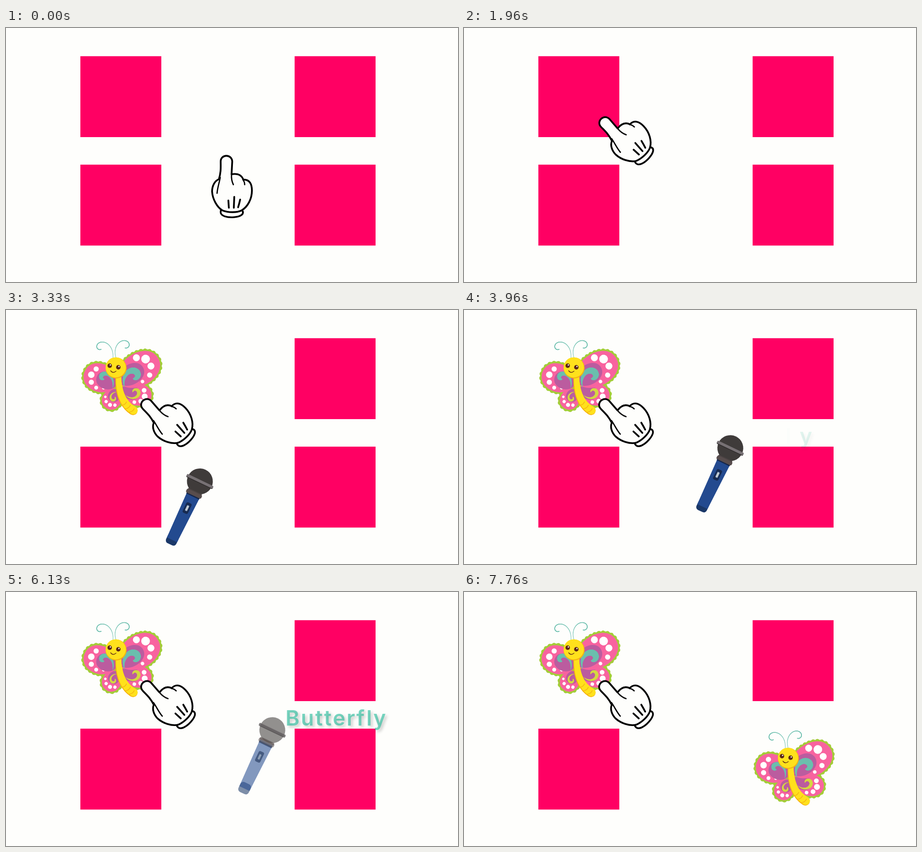
An HTML page with a canvas for the animation above (8 s loop, 998 by 561 pixels).

```html
<!DOCTYPE html>
<html lang="en">
<head>
<meta charset="utf-8">
<title>Memory cards</title>
<style>
html, body { margin: 0; width: 100%; height: 100%; overflow: hidden; background: #fefefc; }
canvas { display: block; width: 998px; height: 561px; }
</style>
</head>
<body>
<canvas id="stage" width="998" height="561"></canvas>
<script>
const ctx = document.getElementById('stage').getContext('2d');
const LOOP = 8000;
const PAPER = '#fefefc', YELLOW = '#ffe11c', ORANGE = '#f5b313', BROWN = '#5c2716';
const TEAL = '#6cbfae', LIME = '#d5d842';
const CARD = 178.7, LEFT = 164.2, RIGHT = 637.3, TOP = 62.3, BOTTOM = 301.8;

const rad = deg => deg * Math.PI / 180;
const mix = (a, b, u) => a + (b - a) * u;
const span = (t, start, length) => Math.min(1, Math.max(0, (t - start) / length));
const easeInOut = u => u < 0.5 ? 2 * u * u : 1 - 2 * (1 - u) ** 2;
const easeOut = u => 1 - (1 - u) ** 3;

function dot(x, y, r, color) {
  ctx.fillStyle = color;
  ctx.beginPath();
  ctx.arc(x, y, r, 0, 7);
  ctx.fill();
}

function line(d, color, width) {
  ctx.strokeStyle = color;
  ctx.lineWidth = width;
  ctx.stroke(new Path2D(d));
}

// Rounded box centred on the vertical axis
function bar(y, w, h, r, color) {
  ctx.fillStyle = color;
  ctx.beginPath();
  ctx.roundRect(-w / 2, y, w, h, r);
  ctx.fill();
}

// Runs from a tip into a curl of the given radius; size(u) is the pen radius
function swirl(x, y, curl, tipX, tipY, dir, color, size) {
  const reach = Math.hypot(tipX - x, tipY - y), from = Math.atan2(tipY - y, tipX - x);
  for (let u = 0; u <= 1; u += 1 / 160) {
    const a = from + dir * u * rad(340), d = mix(curl, reach, (1 - u) ** 5);
    dot(x + d * Math.cos(a), y + d * Math.sin(a), size(u), color);
  }
}
const taper = r => u => 0.3 + r * Math.sin(Math.PI * u) ** 0.8;
const thin = () => 0.75;

// Each wing grows from a root on the body
const WINGS = [
  { x: 247, y: 176, angle: 122, length: 48, half: 21, spots: 4, first: -53, flip: 1 },
  { x: 245, y: 165, angle: 202, length: 77, half: 31, spots: 5, first: -40, flip: -1 },
  { x: 253, y: 176, angle: 15, length: 70, half: 25, spots: 4, first: -40, flip: 1 },
  { x: 248, y: 160, angle: -32, length: 103, half: 36, spots: 5, first: -68, flip: 1 }
];

function leaf({ length: l, half }) {
  const w = half / 0.75;
  const path = new Path2D();
  path.moveTo(0, 0);
  path.bezierCurveTo(l * 0.1, -w, l, -w, l, 0);
  path.bezierCurveTo(l, w, l * 0.1, w, 0, 0);
  return path;
}

function eachWing(paint) {
  for (const wing of WINGS) {
    ctx.save();
    ctx.translate(wing.x, wing.y);
    ctx.rotate(rad(wing.angle));
    ctx.scale(1, wing.flip);
    paint(wing, leaf(wing));
    ctx.restore();
  }
}

function scallops(wing, path) {
  ctx.strokeStyle = '#a3cd38';
  ctx.lineWidth = 7;
  ctx.stroke(path);
  ctx.lineWidth = 10.5;
  ctx.setLineDash([0, 9.5]);
  ctx.stroke(path);
}

function membrane(wing, path) {
  ctx.fillStyle = '#f8639f';
  ctx.fill(path);
  for (let i = 0; i < wing.spots; i++) {
    const a = rad(wing.first + 42 * i);
    dot(wing.length * (0.5 + 0.29 * Math.cos(a)), wing.half * 0.75 * Math.sin(a),
      wing.length * 0.093 * (1 - 0.2 * Math.abs(i - 1)), '#fff');
  }
  ctx.scale(0.62, 0.62);
  ctx.fillStyle = '#bb5c9f';
  ctx.fill(path);
}

function body(shift, shrink, color) {
  for (let u = 0; u <= 1; u += 0.02) {
    const x = mix(mix(248, 248, u), mix(248, 282, u), u);
    const y = mix(mix(148, 204, u), mix(204, 223, u), u);
    dot(x + shift, y - shift, 6.5 + 3.5 * u - shrink, color);
  }
}

function butterfly(dx, dy) {
  ctx.save();
  ctx.translate(dx, dy);
  ctx.lineCap = 'round';
  swirl(207, 81, 6.5, 236, 107, -1, TEAL, thin);
  swirl(265, 77, 7, 243, 106, 1, TEAL, thin);
  eachWing(scallops);
  eachWing(membrane);
  swirl(283, 144, 8, 262, 171, 1, TEAL, taper(6.8));
  swirl(215, 148, 5, 235, 174, -1, TEAL, taper(4.3));
  swirl(286, 182, 6.5, 264, 188, -1, LIME, taper(3));
  swirl(237, 195, 4.5, 244, 181, -1, LIME, taper(1.9));

  body(0, 0, ORANGE);
  body(0.8, 0.8, YELLOW);
  for (let i = 0; i < 3; i++) {
    const x = 254 + 8.5 * i, y = 211 + 7.5 * i;
    line(`M${x} ${y}q9 -1 12 -8`, ORANGE, 1.6);
  }

  dot(243, 128, 23.3, ORANGE);
  dot(242.3, 126.7, 22.3, YELLOW);
  for (const [x, y] of [[229, 123], [248, 126.5]]) {
    dot(x, y, 4.9, BROWN);
    dot(x + 1.4, y - 1.7, 1.5, '#fff');
  }
  line('M231 134Q236 141 243 135', BROWN, 1.3);
  ctx.restore();
}

function card(x, y, scale = 1) {
  const size = CARD * scale, inset = (CARD - size) / 2;
  ctx.fillStyle = '#ff0063';
  ctx.fillRect(x + inset, y + inset, size, size);
}

// Drawn around a pivot inside the palm
function hand(p) {
  ctx.save();
  ctx.translate(mix(492, 350.5, p), mix(346, 242.5, p));
  ctx.rotate(rad(-44 * p));
  ctx.lineCap = ctx.lineJoin = 'round';
  ctx.fillStyle = PAPER;
  const cuff = 'M-17 55C-20 63 -17 67 -9 70C3 74 21 72 28 67C32 64 32 60 29 56Z';
  const palm = 'M-22 -12C-32 -8 -37 4 -37 15C-36 32 -26 50 -14 57C-1 62 18 62 28 57' +
    'C42 49 51 31 51 13C51 -1 46 -12 32 -11C28 -22 18 -25 6 -23L7.500 -51C7 -68 -18 -68 -18 -51C-18 -38 -17 -28 -22 -12Z';
  for (const d of [cuff, palm]) {
    ctx.fill(new Path2D(d));
    line(d, '#000', 3.9);
  }
  line('M-1 35L0 51M12 27L11 51M25 33Q23 42 20.500 50', '#000', 3.9);
  line('M-19 -16C-21 -4 -25 6 -26 19M6 -23Q5 -10 10 0M31 -11Q35 -6 35 0', '#000', 2.8);
  ctx.restore();
}

function microphone(p, alpha) {
  ctx.save();
  ctx.globalAlpha = alpha;
  ctx.translate(mix(-30, 588, p), mix(589, 305, p));
  ctx.rotate(rad(25.5));
  bar(130, 25, 24, 7, '#1a3868');
  ctx.fillStyle = '#234a8f';
  ctx.fill(new Path2D('M-15.500 30H15.500L12.500 143H-12.500Z'));
  bar(33, 31.5, 4, 0, '#15264a');
  dot(0, 0, 28.6, '#3f3b3a');
  bar(24, 34, 6, 2, '#4b4343');
  bar(26, 37, 8.5, 3, '#584d4d');
  bar(-2.5, 64, 6.5, 2, '#2c2929');
  bar(-3.3, 64, 6, 2, '#777174');
  bar(53, 12.6, 25, 3.5, '#172a50');
  bar(58.5, 6, 14, 2, '#4d6a96');
  bar(59.5, 4.4, 12, 1.5, '#c6cdd2');
  ctx.restore();
}

// Letters slide in from the left, last one first
function title(t, alpha) {
  const word = 'Butterfly';
  ctx.save();
  ctx.font = '600 47px Inter, "Open Sans", sans-serif';
  ctx.letterSpacing = '3px';
  ctx.fillStyle = '#10b592';
  ctx.shadowColor = 'rgba(0,0,0,.35)';
  ctx.shadowBlur = 6;
  ctx.shadowOffsetX = ctx.shadowOffsetY = 4;
  for (let i = 0; i < word.length; i++) {
    const u = span(t, 3910 + 45 * (word.length - 1 - i), 700);
    if (!u) continue;
    ctx.globalAlpha = alpha * Math.min(1, u * 1.6);
    const x = 617 + ctx.measureText(word.slice(0, i)).width;
    ctx.fillText(word[i], x - 88 * (1 - easeOut(u)), 294.5);
  }
  ctx.restore();
}

function draw(t) {
  ctx.fillStyle = PAPER;
  ctx.fillRect(0, 0, 998, 561);

  const first = 1 - easeInOut(span(t, 2010, 1000));
  const second = 1 - easeInOut(span(t, 6770, 1000));
  if (first < 1) butterfly(0, 0);
  if (second < 1) butterfly(RIGHT - LEFT, BOTTOM - TOP);
  card(LEFT, TOP, first);
  card(RIGHT, TOP);
  card(LEFT, BOTTOM);
  card(RIGHT, BOTTOM, second);

  const alpha = 1 - span(t, 5690, 1000);
  if (t > 2990 && alpha > 0) {
    microphone(easeOut(span(t, 2990, 940)), alpha);
    title(t, alpha);
  }
  hand(easeInOut(span(t, 998, 1000)));
}

const began = performance.now();
function tick() {
  draw((performance.now() - began) % LOOP);
  requestAnimationFrame(tick);
}
tick();
</script>
</body>
</html>
```
